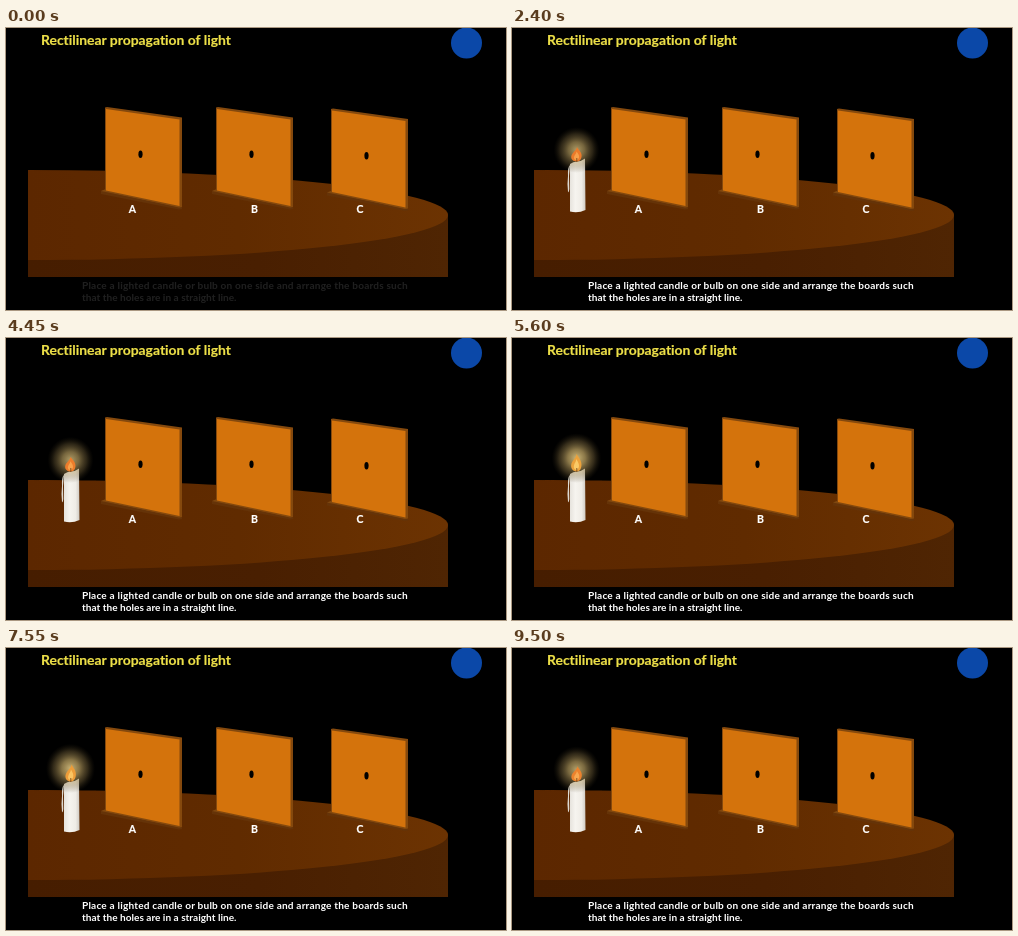
An HTML page for the animation above (9.55 s loop, 500 by 282 pixels).

```html
<!DOCTYPE html>
<html lang="en">
<head>
<meta charset="utf-8">
<title>Rectilinear propagation of light</title>
<style>
  html, body { margin: 0; width: 100%; height: 100%; overflow: hidden; background: #000; }
  svg { display: block; width: 100vw; height: 100vh; }
  text {
    font-family: Lato, "Open Sans", sans-serif; font-weight: 700; fill: #fff;
    font-variant-ligatures: none;
  }
  .title { font-size: 13.9px; fill: #ecdf48; stroke: #ecdf48; stroke-width: .2px; }
  .label { font-size: 10.5px; text-anchor: middle; stroke: #fff; stroke-width: .2px; }
  .caption { font-size: 10.1px; }
</style>
</head>
<body>
<svg viewBox="0 0 500 282">
  <defs>
    <linearGradient id="top">
      <stop offset="0" stop-color="#5c2700"/>
      <stop offset=".5" stop-color="#602b00"/>
      <stop offset="1" stop-color="#6c3302"/>
    </linearGradient>
    <linearGradient id="side">
      <stop offset="0" stop-color="#461d00"/>
      <stop offset=".55" stop-color="#491f01"/>
      <stop offset="1" stop-color="#4f2503"/>
    </linearGradient>
    <linearGradient id="wax">
      <stop offset="0" stop-color="#e6e3dd"/>
      <stop offset=".35" stop-color="#f6f4ef"/>
      <stop offset=".75" stop-color="#efece6"/>
      <stop offset="1" stop-color="#cfcbc4"/>
    </linearGradient>
    <radialGradient id="halo">
      <stop offset="0" stop-color="#f2d88e" stop-opacity=".9"/>
      <stop offset=".35" stop-color="#d2b56e" stop-opacity=".7"/>
      <stop offset=".7" stop-color="#8a7444" stop-opacity=".4"/>
      <stop offset="1" stop-color="#403418" stop-opacity="0"/>
    </radialGradient>
    <g id="board">
      <path d="M95 163 L100 161 L176 177.5 V181 L173 181.500 L95 166Z" fill="#653308"/>
      <path d="M95 163 L100 161 L176 177.5 L173 179Z" fill="#80480f"/>
      <path d="M99 79.5 L101 79 L176 89.5 V179 L173 179.5 L99 163Z" fill="#85490d"/>
      <path d="M100 81 L173.500 91.500 V178 L100 162.500Z" fill="#d4730c"/>
      <ellipse cx="134.500" cy="126.300" rx="2.100" ry="3.700"/>
    </g>
  </defs>

  <path d="M22 187 H442 V249 H22Z" fill="url(#side)"/>
  <path d="M22 142 A420 45 0 0 1 22 232Z" fill="url(#top)"/>

  <use href="#board"/>
  <use href="#board" x="111"/>
  <use href="#board" x="226" y="1.500"/>

  <g id="candle">
    <path d="M58 136 Q61 133.500 65 133.500 Q70 133 73 130.500 L73.500 182 Q66 185.500 58 183.500Z" fill="url(#wax)"/>
    <path d="M58 137 Q55.500 139 56 148 Q55 156 56 164 Q57 165 57.300 161 L57 148Z" fill="#dedad2"/>
    <circle id="glow" cx="64.500" r="25" fill="url(#halo)"/>
    <g id="flame">
      <path id="outer" d="M65 115.500 C66 119 70.500 122 69.500 128 C69 132 67 133.500 64.500 133.500 C61.500 133.500 58.800 131 59.300 127 C60 122.500 64.500 120 65 115.500Z"/>
      <path id="inner" d="M64.500 121 C66.500 124.500 67.500 126 67 129 Q66 132.500 64 132 Q61.500 131 62 128 C62.500 125 64.500 124 64.500 121Z"/>
    </g>
    <path d="M64.800 130 V134" stroke="#6a4018" stroke-width=".8"/>
  </g>

  <text class="title" x="35" y="16.500">Rectilinear propagation of light</text>
  <text class="label" x="126.500" y="184.500">A</text>
  <text class="label" x="248.500" y="185">B</text>
  <text class="label" x="354" y="185">C</text>
  <g id="caption" class="caption">
    <text x="76" y="261" letter-spacing=".18">Place a lighted candle or bulb on one side and arrange the boards such</text>
    <text x="76" y="272.500">that the holes are in a straight line.</text>
  </g>
  <circle cx="460.500" cy="15" r="15.500" fill="#0b48a8"/>
</svg>
<script>
  const LOOP = 9550, STEP = 50, FLICKER = 700;
  const el = id => document.getElementById(id);
  const [candle, caption, glow, flame, outer, inner] =
    ["candle", "caption", "glow", "flame", "outer", "inner"].map(el);
  const ramp = (t, from, to) => Math.min(1, Math.max(0, (t - from) / (to - from)));
  const mix = (a, b, k) => `rgb(${a.map((v, i) => Math.round(v + (b[i] - v) * k))})`;

  function draw(t) {
    candle.setAttribute("opacity", ramp(t, 0, 750));
    caption.setAttribute("opacity", 0.12 + 0.88 * ramp(t, 0, 750));

    // The flame rests until it is fully lit, then flickers.
    const phase = 2 * Math.PI * (Math.max(t, 950) - 1350) / FLICKER;
    const tall = 0.5 + 0.5 * Math.cos(phase);
    const lit = ramp(t, 950, 1900);
    const sway = 3 * Math.sin(phase);
    flame.setAttribute("transform",
      `translate(64.5 133) skewX(${sway}) scale(1 ${0.8 + 0.2 * tall}) translate(-64.5 -133)`);
    outer.setAttribute("fill", mix([236, 122, 42], [236, 164, 60], tall * (0.3 + 0.7 * lit)));
    inner.setAttribute("fill", mix([248, 160, 74], [250, 204, 104], tall));
    glow.setAttribute("r", 17 + 6 * lit + 2 * tall * lit);
    glow.setAttribute("cy", 122 - 2 * tall);
    glow.setAttribute("opacity", 0.15 + 0.65 * lit + 0.15 * tall * lit);
  }

  function tick() {
    const t = performance.now() % LOOP;
    draw(Math.floor(t / STEP) * STEP);
    requestAnimationFrame(tick);
  }
  tick();
</script>
</body>
</html>
```
